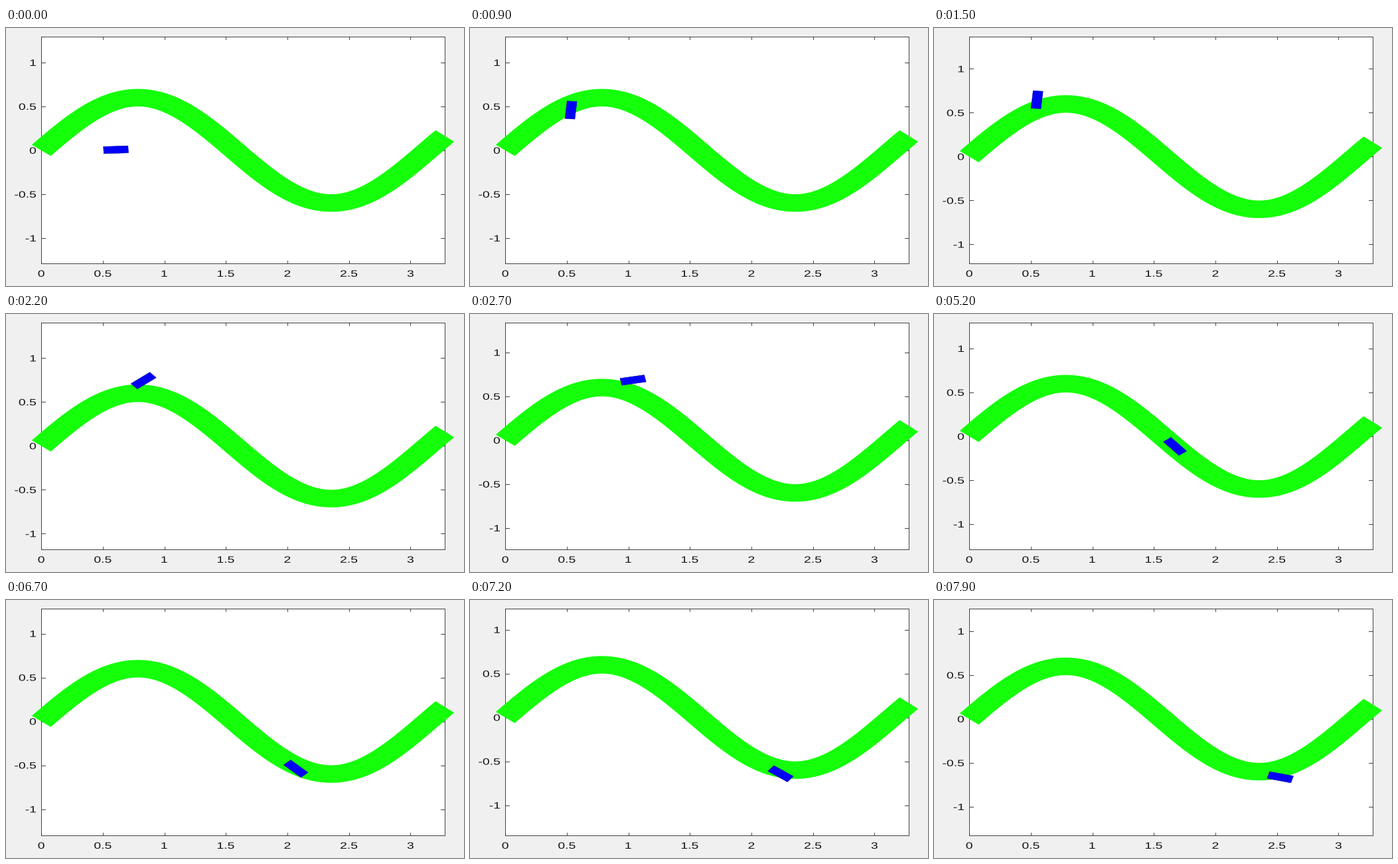
These frames come from a looping animation (690 by 388 pixels, 8000 ms). A matplotlib script:

```python
import numpy as np
import matplotlib.pyplot as plt
from matplotlib.animation import FuncAnimation
from matplotlib.lines import Line2D
from matplotlib.patches import PathPatch, Polygon, Rectangle
from matplotlib.textpath import TextPath
from matplotlib.transforms import Affine2D

W, H, DPI = 690, 388, 100
FRAMES, STEP = 80, 100
LEFT, RIGHT, TOP, BOTTOM = 53, 661, 13, 354
X0, Y0, SX, SY = 53.1, 184.0, 185.4, 132.0
ASPECT = SX / SY              # the whole picture is widened by this factor
PX = 72 / DPI
INK, TEXT = "#303030", "#141414"

ROAD_END, AMP, HALF = 3.28, 0.6, 0.1
LENGTH, WIDTH = 0.2, 0.08
REACH = 0.285                 # from the tracking point to the car's middle
JOIN = 0.612                  # x where the car starts to follow the road


def road(x):
    return AMP * np.sin(2 * x)


def road_outline():
    x = np.linspace(0, ROAD_END, 200)
    mid = np.column_stack([x, road(x)])
    slope = 2 * AMP * np.cos(2 * x)
    normal = np.column_stack([-slope, np.ones_like(x)])
    normal *= HALF / np.hypot(slope, 1)[:, None]
    return np.vstack([mid + normal, (mid - normal)[::-1]])


def car_path():
    """Left turn, straight, right turn, then the road with a fading overshoot."""
    s = np.linspace(0, 0.696, 700)
    turn = np.radians(np.interp(s, [0, 0.2835, 0.509, 0.696], [2.6, 85, 85, 40]))
    x1 = 0.321 + np.cumsum(np.cos(turn)) * s[1]
    y1 = -0.006 + np.cumsum(np.sin(turn)) * s[1]

    x2 = np.linspace(JOIN + 0.002, 2.5, 1000)
    u = x2 - JOIN
    y2 = road(x2) + 0.43 * u * np.exp(-u / 0.3) - 0.008
    follow = np.arctan(np.gradient(y2, x2))

    x, y = np.append(x1, x2), np.append(y1, y2)
    dist = np.append(0, np.cumsum(np.hypot(np.diff(x), np.diff(y))))
    return dist, x, y, np.append(turn, follow)


DIST, *PATH = car_path()


def travelled(t):
    """Steady speed, then a gentle gain between 2 s and 4 s."""
    ramp = np.clip(t - 2, 0, 2)
    return 0.316 * t + 0.018 * ramp ** 2 + 0.072 * max(t - 4, 0)


def car_pose(t):
    x, y, a = (np.interp(travelled(t), DIST, v) for v in PATH)
    ahead = np.array([np.cos(a), np.sin(a)])
    side = np.array([-ahead[1], ahead[0]])
    center = np.array([x, y]) + REACH * ahead
    corners = [center + i * LENGTH / 2 * ahead + j * WIDTH / 2 * side
               for i, j in ((1, 1), (1, -1), (-1, -1), (-1, 1))]
    return center[1], a, np.array(corners)


def view_center(y, a):
    """Middle of the vertical limits, which grow with the car's reach."""
    reach = 0.19 * abs(np.sin(a)) + 0.068 * np.cos(a)
    edge = AMP + HALF
    return (max(edge, y + reach) + min(-edge, y - reach)) / 2


fig = plt.figure(figsize=(W / DPI, H / DPI), dpi=DPI, facecolor="#f0f0f0")
ax = fig.add_axes([0, 0, 1, 1])
ax.set_xlim(0, W)
ax.set_ylim(H, 0)
ax.axis("off")

still = ax.transData
shift = Affine2D()
moving = shift + ax.transData
world = Affine2D().scale(SX, -SY).translate(X0, Y0) + moving


def add(artist):
    ax.add_artist(artist)
    artist.set_clip_on(False)
    return artist


def line(xs, ys, tf):
    add(Line2D(xs, ys, color=INK, lw=0.9 * PX, transform=tf, zorder=2))


def label(text, x, y, align, tf):
    path = TextPath((0, 0), text, size=13.8, prop={"family": "Liberation Sans"})
    box = path.get_extents()
    anchor = box.x1 if align == "right" else (box.x0 + box.x1) / 2
    place = Affine2D().translate(-anchor, 0).scale(ASPECT, -1).translate(x, y + 5)
    add(PathPatch(path, fc=TEXT, lw=0, transform=place + tf, zorder=2))


add(Rectangle((LEFT, TOP), RIGHT - LEFT, BOTTOM - TOP, fc="white", ec=INK,
              lw=0.9 * PX, transform=still, zorder=1))

for v in np.arange(0, 3.5, 0.5):
    x = X0 + v * SX
    line([x, x], [BOTTOM, BOTTOM - 4], still)
    line([x, x], [TOP, TOP + 4], still)
    label(f"{v:g}", x, 369, "center", still)

for v in np.arange(-1, 1.5, 0.5):
    y = Y0 - v * SY
    line([LEFT, LEFT + 6], [y, y], moving)
    line([RIGHT, RIGHT - 6], [y, y], moving)
    label(f"{v:g}", 45, y, "right", moving)

add(Polygon(road_outline(), fc="#14ff09", lw=0, transform=world, zorder=3))
car = add(Polygon(car_pose(0)[2], fc="#0000f8", ec="#0000a0", lw=0.6 * PX,
                  transform=world, zorder=4))


def draw(i):
    y, a, corners = car_pose(i * STEP / 1000)
    car.set_xy(corners)
    shift.clear().translate(0, SY * view_center(y, a))
    return ()


anim = FuncAnimation(fig, draw, frames=FRAMES, interval=STEP, repeat=True,
                     repeat_delay=0, blit=False)
plt.show()
```
